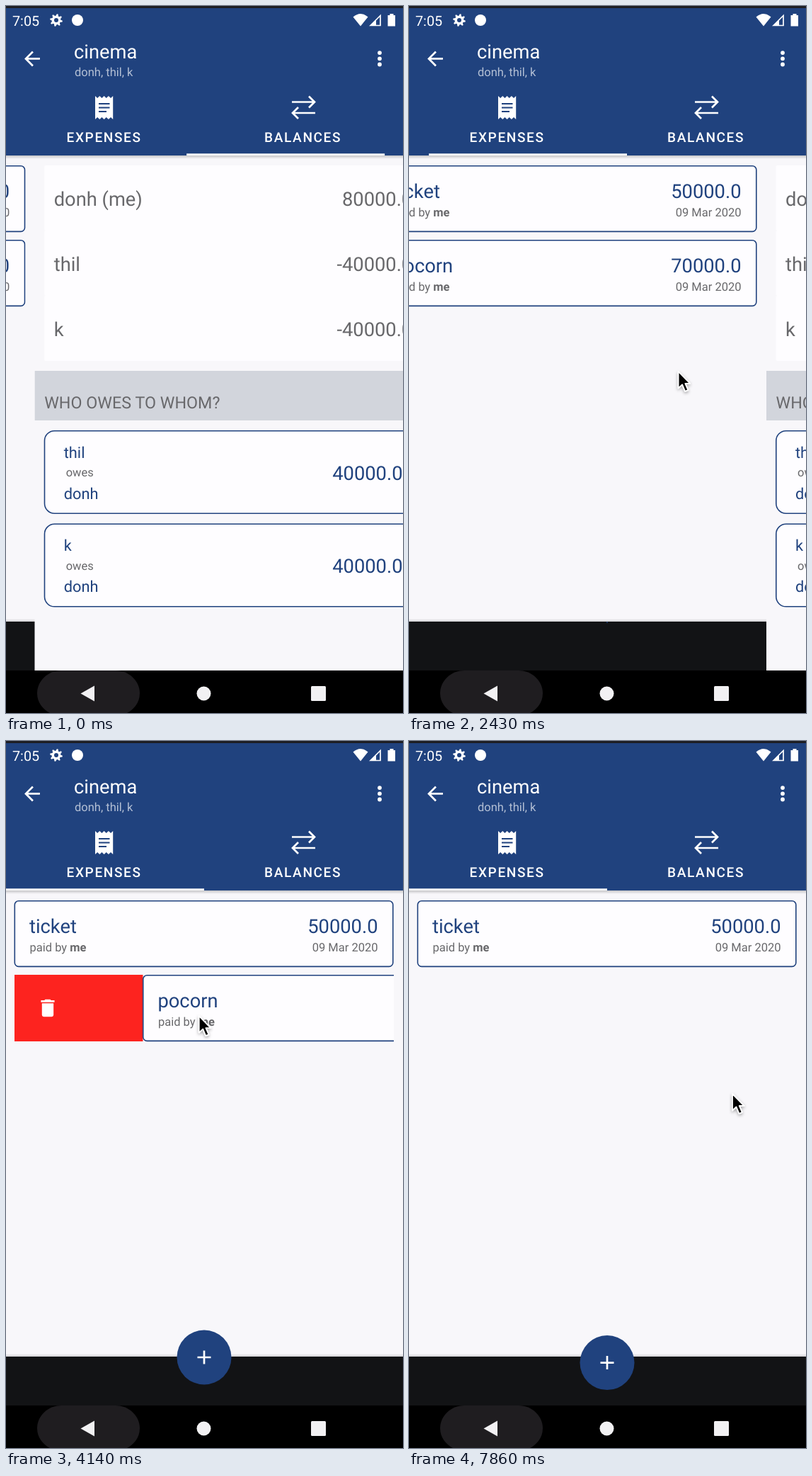
An HTML page for the animation above (8 s loop, 561 px wide and 998 px high).

```html
<!DOCTYPE html>
<html lang="en">
<head>
<meta charset="utf-8">
<title>Shared expenses</title>
<style>
  html, body { margin: 0; width: 100%; height: 100%; overflow: hidden; background: #f8f7fa; }
  svg { display: block; width: 100%; height: 100%; }
  text { font-family: Roboto, sans-serif; white-space: pre; text-rendering: geometricPrecision; }
  .big { font-size: 27.3px; }
  .mid { font-size: 21.8px; }
  .small { font-size: 16.5px; }
  .caps { font-size: 19.1px; font-weight: 500; letter-spacing: 1.6px; }
  .blue { fill: #20427e; }
  .grey { fill: #68686b; }
  .white { fill: #fff; }
  .end { text-anchor: end; }
  .card { fill: #fefdff; stroke: #20427e; stroke-width: 1.6; }
  .line { fill: none; stroke: #fff; stroke-width: 2.7; }
  .thin { stroke-width: 1.7; }
</style>
</head>
<body>
<svg viewBox="0 0 561 998" xmlns="http://www.w3.org/2000/svg">
  <defs>
    <linearGradient id="fadeDown" x2="0" y2="1">
      <stop offset="0" stop-opacity=".2"/><stop offset="1" stop-opacity="0"/>
    </linearGradient>
    <linearGradient id="fadeUp" x2="0" y2="1">
      <stop offset="0" stop-opacity="0"/><stop offset="1" stop-opacity=".16"/>
    </linearGradient>
    <filter id="soft" x="-30%" y="-30%" width="160%" height="170%">
      <feDropShadow dx="0" dy="2" stdDeviation="2" flood-opacity=".35"/>
    </filter>
    <clipPath id="list"><rect x="11.5" y="211" width="536.5" height="727"/></clipPath>
  </defs>

  <rect width="561" height="998" fill="#f8f7fa"/>

  <g id="expenses">
    <g id="bar">
      <rect y="865" width="561" height="4" fill="url(#fadeUp)"/>
      <rect y="869" width="561" height="70" fill="#121315"/>
    </g>
    <g id="first"></g>
    <g id="row" clip-path="url(#list)">
      <g id="remove">
        <rect id="red" x="12" y="330" height="94" fill="#fd231f"/>
        <path class="white" transform="translate(42.6 360.6) scale(1.365)"
          d="M6 19c0 1.1.9 2 2 2h8c1.1 0 2-.9 2-2V7H6zM19 4h-3.5l-1-1h-5l-1 1H5v2h14z"/>
      </g>
      <g id="second"></g>
    </g>
  </g>

  <g id="balances"></g>

  <g id="fab">
    <circle r="38.5" class="blue"/>
    <path class="line" d="M-9.5 0H9.5M0-9.5V9.5"/>
  </g>

  <g id="toast" filter="url(#soft)">
    <rect x="9" y="861.5" width="541" height="65" rx="5" fill="#2e2c2f"/>
    <text x="42" y="901" font-size="19.1" letter-spacing=".55" fill="#e6e5e7">You deleted an expense</text>
    <text class="caps" x="464" y="901" fill="#858487">UNDO</text>
  </g>

  <g id="header">
    <rect y="211" width="561" height="5" fill="url(#fadeDown)"/>
    <rect width="561" height="211" class="blue"/>
    <rect width="561" height="3" fill="#1d1e24"/>
    <text x="9" y="27.5" font-size="19.8" class="white">7:05</text>
    <path id="gear" class="white" fill-rule="evenodd"/>
    <circle cx="101" cy="20" r="8" class="white"/>
    <path class="white" d="M490.5 15.5Q501 6.5 511.5 15.5L501 28.5Z"/>
    <path class="line thin" d="M515 27.5L529 13.5V27.5Z"/>
    <path class="white" d="M514 28L523 19V28Z"/>
    <path class="white" d="M542.5 11H547.5V13H550V28.5H539.5V13H542.5Z"/>
    <path class="white" transform="translate(20.6 58.1) scale(1.365)"
      d="M20 11H7.8l5.6-5.6L12 4l-8 8 8 8 1.4-1.4L7.8 13H20z"/>
    <path class="white" id="dots"/>
    <text class="big white" x="96" y="74">cinema</text>
    <text class="small" x="97" y="99" fill="#b4c0d5">donh, thil, k</text>
    <path id="receipt" class="white"/>
    <path d="M131 138H146.5M131 143.5H146.5M131 149H142" stroke="#20427e" stroke-width="1.8"/>
    <path class="line" d="M404 135.5H435M428 127.5L436 135.5L428 143.5M437 151H406M413 143L405 151L413 159"/>
    <text class="caps white" x="85.5" y="191.5">EXPENSES</text>
    <text class="caps white" x="365" y="191.5">BALANCES</text>
    <rect id="mark" y="208.3" width="280" height="2.7" class="white"/>
  </g>

  <g id="nav">
    <rect y="938" width="561" height="60"/>
    <path d="M78 938H155C174 938 189 953 189 970C189 983 181 993 171 998H62C52 993 44 983 44 970C44 953 59 938 78 938Z" fill="#1f1d20"/>
    <g fill="#f2f1f3">
      <path d="M105.5 970.5L125 959.5V981.5Z"/>
      <circle cx="279.5" cy="970.5" r="10"/>
      <rect x="431" y="960" width="21" height="21" rx="1.5"/>
    </g>
  </g>

  <path id="cursor" filter="url(#soft)" stroke="#fff" stroke-width="1.8" stroke-linejoin="round"
    d="M1 1V24.5L6.5 19.5L10.5 29L14.7 27.2L10.7 18H17.5Z"/>
</svg>

<script>
const $ = id => document.getElementById(id);
const LOOP = 8000, FRAME = 1000 / 7, WIDTH = 561;

const text = (cls, x, y, str) => `<text class="${cls}" x="${x}" y="${y}">${str}</text>`;
const disc = (x, y, r) => `M${x - r} ${y}a${r} ${r} 0 1 0 ${2 * r} 0a${r} ${r} 0 1 0 ${-2 * r} 0Z`;

function expense(y, name, amount) {
  return `<rect class="card" x="12.3" y="${y + .8}" width="534.5" height="92.6" rx="5.5"/>` +
    text('big blue', 33, y + 46, name) +
    text('small grey', 33.5, y + 71.5, 'paid by <tspan font-weight="700">me</tspan>') +
    text('big blue end', 525.5, y + 46, amount) +
    text('small grey end', 525.5, y + 71.5, '09 Mar 2020');
}

function person(name, amount, i) {
  const y = 225 + i * 92;
  return `<rect x="13.5" y="${y}" width="534" height="92" rx="2" fill="#fefdff"/>` +
    text('big grey', 27, y + 56.5, name) + text('big grey end', 533.5, y + 56.5, amount);
}

function debt(name, i) {
  const y = 599.7 + i * 131.6;
  return `<rect class="card" x="13.8" y="${y}" width="533" height="116.5" rx="14"/>` +
    text('mid blue', 41, y + 37.8, name) + text('small grey', 44, y + 64.5, 'owes') +
    text('mid blue', 41, y + 96, 'donh') + text('big blue end', 519.8, y + 69, '40000.0');
}

function gearPath(cx, cy) {
  const pts = [];
  for (let i = 0; i < 32; i++) {
    const a = (i + .5) * Math.PI / 16;
    const r = i % 4 < 2 ? 8.9 : 6.3;
    pts.push(`${cx + r * Math.cos(a)} ${cy + r * Math.sin(a)}`);
  }
  return `M${pts.join('L')}Z` + disc(cx, cy, 3);
}

function receiptPath() {
  let top = '', bottom = '';
  for (let i = 0; i <= 8; i++) {
    const x = 126 + i * 3.15, notch = i % 2 * 3;
    top += `L${x} ${127 + notch}`;
    bottom = `L${x} ${160 - notch}` + bottom;
  }
  return 'M' + top.slice(1) + bottom + 'Z';
}

$('first').innerHTML = expense(225, 'ticket', '50000.0');
$('second').innerHTML = expense(330, 'pocorn', '70000.0');
$('balances').innerHTML = '<rect y="211" width="561" height="727" fill="#f8f7fa"/>' +
  person('donh (me)', '80000.0', 0) + person('thil', '-40000.0', 1) + person('k', '-40000.0', 2) +
  '<rect y="515" width="561" height="70" fill="#d2d5dc"/>' +
  '<text class="grey" font-size="23.3" x="13.5" y="567.5">WHO OWES TO WHOM?</text>' +
  debt('thil', 0) + debt('k', 1);
$('gear').setAttribute('d', gearPath(71, 20));
$('dots').setAttribute('d', [-1, 0, 1].map(i => disc(528, 74.3 + i * 8.2, 2.9)).join(''));
$('receipt').setAttribute('d', receiptPath());

// Eased progress from 0 to 1 between two times.
function ease(t, from, to) {
  const u = Math.min(1, Math.max(0, (t - from) / (to - from)));
  return u * u * (3 - 2 * u);
}

// Where the pointer rests or turns: time, x, y.
const stops = [[570, -40, 570], [1840, 262, 557], [2290, 435, 535], [2714, 214, 455], [3880, 88, 396],
  [4410, 460, 378], [5290, 460, 377], [6290, 443, 487], [7000, 492, 522], [7860, 456, 497]];

function pointer(t) {
  let [, x, y] = stops[0];
  for (let i = 1; i < stops.length; i++) {
    const [t0, x0, y0] = stops[i - 1], [t1, x1, y1] = stops[i];
    const p = ease(t, t0, t1);
    x += (x1 - x0) * p;
    y += (y1 - y0) * p;
  }
  return [x, y];
}

const move = (id, x, y, scale = 1) =>
  $(id).setAttribute('transform', `translate(${x} ${y}) scale(${scale})`);
const show = (id, on) => { $(id).style.display = on ? '' : 'none'; };

function draw(ms) {
  const t = Math.floor((ms + 5) / FRAME) * FRAME;

  const settle = 1 - ease(t, 0, 286);
  const x = 40.7 * settle + WIDTH * ease(t, 1843, 2571);
  move('expenses', x - WIDTH, 0);
  move('balances', x, 0);
  $('mark').setAttribute('x', 280.5 * (1 - x / WIDTH) - 5 * settle);

  const swipe = 560 * ease(t, 3880, 4571);
  show('row', t < 4571);
  show('remove', swipe > 0);
  $('red').setAttribute('width', swipe);
  move('second', swipe, 0);

  const leave = ease(t, 4430, 4714), back = ease(t, 7500, 7912);
  move('bar', 0, 80 * (leave - ease(t, 7571, 7857)));
  const size = ease(t, 2400, 2714) - leave + ease(t, 7430, 7571);
  show('fab', size > 0);
  move('fab', 280, 870 + 110 * leave * (size < 1 && t < 5000 ? 0 : 1 - ease(t, 7571, 7912)), size);

  const alpha = leave - ease(t, 7430, 7714);
  show('toast', alpha > 0);
  $('toast').style.opacity = alpha;

  move('cursor', ...pointer(t));
}

const start = performance.now();
function tick() {
  draw((performance.now() - start) % LOOP);
  requestAnimationFrame(tick);
}
draw(0);
requestAnimationFrame(tick);
</script>
</body>
</html>
```
